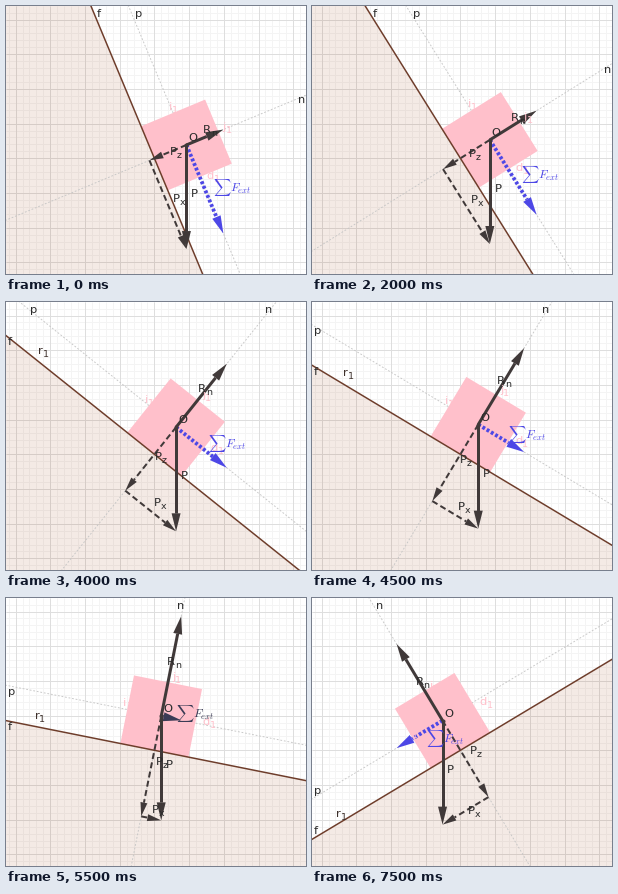
Recreate the animation shown at these times as a matplotlib script. Size 300 px wide and 268 px high, loop 8000 ms.

```python
import numpy as np
import matplotlib.pyplot as plt
from matplotlib.animation import FuncAnimation

W, H, DPI = 300, 268, 100
PT = 72 / DPI                     # points per pixel
UNIT = 34.7                       # pixels per grid unit
PIVOT = np.array([148.4, 152.3])
FRAMES, STEP = 16, 500

DARK, INK, BLUE, SLATE = "#403939", "#2b2b2b", "#4d47e6", "#3b3b55"
BROWN, PINK = "#6e3d2b", "#ffc0cb"

plt.rcParams["font.family"] = "DejaVu Sans"
plt.rcParams["mathtext.fontset"] = "cm"

fig = plt.figure(figsize=(W / DPI, H / DPI), dpi=DPI, facecolor="white")
ax = fig.add_axes([0, 0, 1, 1])


def grid(step, color):
    xs = np.arange(PIVOT[0] % step, W, step)
    ys = np.arange(PIVOT[1] % step, H, step)
    ax.vlines(xs, 0, H, color=color, lw=PT, zorder=0)
    ax.hlines(ys, 0, W, color=color, lw=PT, zorder=0)


def line(a, b, color, width, style="-", z=3):
    ax.plot([a[0], b[0]], [a[1], b[1]], color=color, lw=width * PT,
            ls=style, zorder=z, dash_capstyle="butt", solid_capstyle="butt")


def label(x, y, text, sub="", color=INK):
    main = ax.text(x, y, text, fontsize=11.5 * PT, color=color, zorder=9)
    if sub:
        ax.annotate(sub, xy=(1, 0), xycoords=main, xytext=(0, -1 * PT),
                    textcoords="offset points", fontsize=9.5 * PT,
                    color=color, va="baseline", zorder=9)


def arrow(a, b, color, width, head, style="-", z=5):
    """Draw a vector and return where its label goes."""
    d = b - a
    size = np.hypot(*d)
    if size < 1:
        return (a + b) / 2 + np.array([0, 4.8])
    u = d / size
    side = np.array([u[1], -u[0]])
    head = min(head, size)
    base = b - u * head
    line(a, base, color, width, style, z)
    wing = side * head / 4
    ax.fill(*np.array([b, base + wing, base - wing]).T, color=color, lw=0,
            zorder=z)
    return (a + b) / 2 + 4.8 * side


def edge_label(text, point, m):
    """Name a slanted line where it enters the view at the top or left."""
    y0 = point[1] - m * point[0]
    if y0 < 0:
        label(-y0 / m + 4 + 5 / m, 11, text)
    else:
        label(2, y0 + (9.5 if m > 0 else -5), text)


def normal_label(o, m):
    if m > 0 and o[1] - (W - o[0]) / m > 0:
        label(292, o[1] - (292 - o[0]) / m + 4.7, "n")
    else:
        x0 = o[0] + m * o[1]
        label(x0 - 7 - 5 * m if m > 0 else x0 + 4 - 5 * m, 11, "n")


def draw(i):
    ax.cla()
    ax.set_xlim(0, W)
    ax.set_ylim(H, 0)
    ax.axis("off")
    grid(UNIT / 5, "#f4f4f4")
    grid(UNIT, "#dedede")

    m = round(2.4 - 0.2 * i, 3)   # slope of the incline
    a = np.arctan(m)
    t = np.array([np.cos(a), np.sin(a)])
    n = np.array([np.sin(a), -np.cos(a)])
    o = PIVOT + UNIT * n
    far = 500

    # incline and block
    ground = [PIVOT - far * t, PIVOT + far * t,
              PIVOT + far * (t - n), PIVOT - far * (t + n)]
    ax.fill(*np.array(ground).T, color=(0.6, 0.2, 0, 0.1), lw=0, zorder=1)
    dots = (0, (2, 2))
    line(o - far * t, o + far * t, "#c6c6c6", 0.9, dots, 1.5)
    line(o - far * n, o + far * n, "#c6c6c6", 0.9, dots, 1.5)
    block = [o + UNIT * (p * t + q * n)
             for p, q in ((-1, -1), (1, -1), (1, 1), (-1, 1))]
    ax.fill(*np.array(block).T, color=PINK, lw=0, zorder=2)
    line(PIVOT - far * t, PIVOT + far * t, BROWN, 1.5)

    # side names of the block
    for name, side, dx, dy in (("i", -t, -4, -3), ("d", t, 7, 2),
                               ("j", n, 4, -2)):
        x, y = o + UNIT * side
        label(x + dx, y + dy, name, "1", PINK)

    # forces
    weight = 3 * UNIT * np.array([0, 1])
    press = -3 * UNIT * np.cos(a) * n
    slide = 3 * UNIT * np.sin(a) * t
    dash = (0, (3, 1.7))
    pz = arrow(o, o + press, DARK, 2, 14, dash)
    px = arrow(o + press, o + weight, DARK, 2, 14, dash)
    blue = BLUE if abs(m) > 0.3 else SLATE
    total = arrow(o, o + slide, blue, 3.8, 18, (0, (0.75, 0.55)), 4)
    rn = arrow(o, o - press, DARK, 3, 18)
    p = arrow(o, o + weight, DARK, 3, 18)
    ax.plot(*o, "o", ms=4 * PT, color=DARK, mew=0, zorder=6)

    label(*rn, "R", "n")
    label(*p, "P")
    label(pz[0], pz[1] - 2, "P", "z")
    label(px[0], px[1] - 1, "P", "x")
    label(o[0] + 2, o[1] - 4, "O")
    ax.text(total[0] + 4, total[1], r"$\sum F_{ext}$", fontsize=12 * PT,
            color=blue, va="center", zorder=9)

    # line names
    edge_label("f", PIVOT, m)
    edge_label("p", o, m)
    normal_label(o, m)
    x = 27.5 + 5.5 * m
    label(x, PIVOT[1] + m * (x - PIVOT[0]) - 7.5, "r", "1", "#3c2f2a")
    for text in ax.texts:
        text.set_clip_on(True)
    return []


anim = FuncAnimation(fig, draw, frames=FRAMES, interval=STEP,
                     init_func=lambda: draw(0), repeat=True, repeat_delay=0,
                     blit=False)
plt.show()
```
